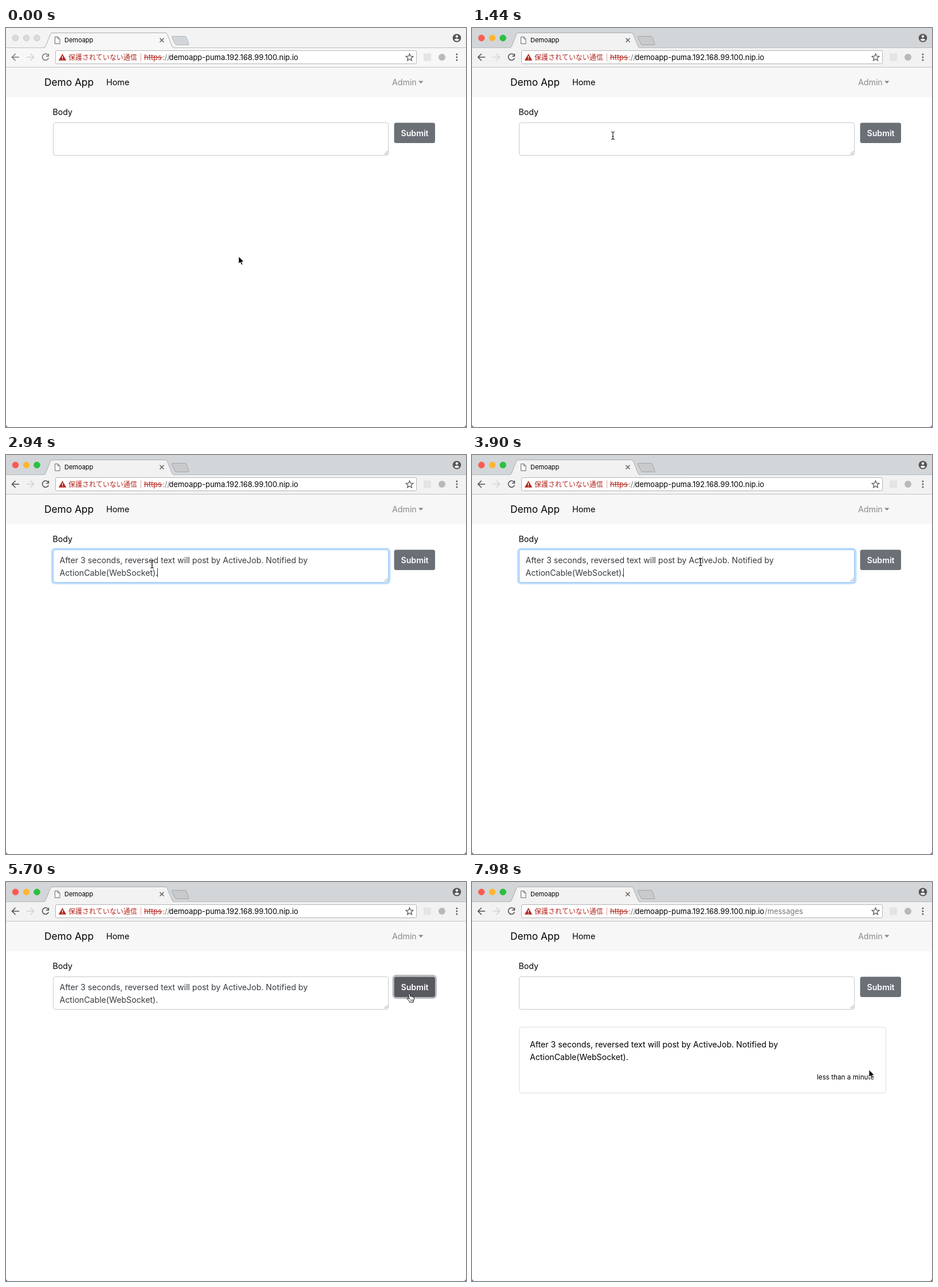
These frames come from a looping animation (803 by 697 pixels, 8 s). An HTML page:

```html
<!DOCTYPE html>
<html lang="en">
<head>
<meta charset="utf-8">
<title>Demoapp</title>
<style>
html, body { margin: 0; width: 100%; height: 100%; overflow: hidden; background: #fff; }
svg { display: block; width: 803px; height: 697px; font: 14.15px Inter, sans-serif; cursor: none; }
text { fill: #000; }
.strip { fill: #f3f3f3; }
.bar { fill: #f7f7f7; }
.tab { fill: #f7f7f7; stroke: #a9abad; }
.plus { fill: #d2d6da; stroke: #b4b7ba; }
.lamps circle { fill: #dadada; stroke: #c8c8c8; }
.nav { stroke: #777; }
.active .strip { fill: #d2d6d9; }
.active .bar, .active .tab { fill: #f2f2f2; }
.active .plus { fill: #c8cacc; stroke: #a2a4a6; }
.active .nav { stroke: #505050; }
.active .lamps circle { fill: var(--c); stroke: var(--c); }
.line { fill: none; stroke-width: 1.6; }
.small { font-size: 11px; }
.url { font-size: 12.95px; }
.typed text { fill: #363b41; }
.url .warn { fill: #b3261e; }
.jp { font: 12px "Noto Sans CJK JP", "Noto Sans CJK", sans-serif; }
.pointer { stroke: #fff; stroke-width: 1; stroke-linejoin: round; }
</style>
</head>
<body>
<svg id="win" viewBox="0 0 803 697">
  <rect width="803" height="697" fill="#fff"/>

  <!-- tab strip -->
  <rect class="strip" width="803" height="34"/>
  <g class="lamps">
    <circle cx="16.5" cy="17.5" r="5.3" style="--c:#fb5a52"/>
    <circle cx="35.5" cy="17.5" r="5.3" style="--c:#fdb632"/>
    <circle cx="54" cy="17.5" r="5.3" style="--c:#2bbf3f"/>
  </g>
  <rect class="bar" y="34" width="803" height="34"/>
  <path d="M0 34.5H803" stroke="#b9bbbd"/>
  <path class="tab" d="M66 34.5Q68.5 34 69.5 31L77.5 11Q78.5 8.5 81 8.5H278Q280.5 8.5 281.5 11L289.5 31Q290.5 34 293 34.5"/>
  <path class="bar" d="M68 34H291V36H68Z"/>
  <path class="plus" d="M291 14.5H312Q314 14.5 315 16.5L319 27.5Q320 29.5 318 29.5H298Q296 29.5 295 27.5L289.5 16.5Q289 14.5 291 14.5Z"/>
  <path d="M85.5 15.5H90.5L94 19V27.5H85.5ZM90.5 15.5V19H94" fill="#fff" stroke="#666"/>
  <text class="small" x="102" y="25">Demoapp</text>
  <path class="line" d="M268.5 17.7L275.5 24.7M275.5 17.7L268.5 24.7" stroke="#555" style="stroke-width:1.3"/>
  <circle cx="787" cy="17.5" r="7.3" fill="#555"/>
  <circle cx="787" cy="14.7" r="2.3" fill="#f2f2f2"/>
  <path d="M782.5 20.5Q787 16.5 791.5 20.5Q787 25 782.5 20.5Z" fill="#f2f2f2"/>

  <!-- toolbar -->
  <path class="line nav" d="M23 51H11M16.5 45L10.5 51L16.5 57"/>
  <path class="line" d="M36 51H48M42.5 45L48.5 51L42.5 57" stroke="#d2d2d2"/>
  <path class="line nav" d="M73.5 47.3A5.6 5.6 0 1 0 74.3 52.5M74.3 45V49.3H70"/>
  <rect x="86.5" y="39.5" width="630" height="23" rx="2" fill="#fff" stroke="#b5b5b5"/>
  <path d="M98.5 45L105.2 56.7H91.8Z" fill="#b3261e"/>
  <path d="M98.5 48.8V53M98.5 54V55.3" stroke="#fff" stroke-width="1.4"/>
  <path d="M235.5 44V58" stroke="#d9a5a2"/>
  <g class="url">
    <text class="warn jp" x="109" y="55.5">保護されていない通信</text>
    <text class="warn" x="241" y="55.5">https</text>
    <path d="M241 51.5H273" stroke="#b3261e"/>
    <text x="273" y="55.5" style="fill:#777">://</text>
    <text x="284.5" y="55.5">demoapp-puma.192.168.99.100.nip.io</text>
    <text id="path" x="511" y="55.5" style="fill:#777">/messages</text>
  </g>
  <path id="star" fill="none" stroke="#5a5a5a" stroke-width="1.3"/>
  <rect x="729" y="44.5" width="13" height="13" fill="#e4e4e4"/>
  <circle cx="761" cy="51" r="6" fill="#b9b9b9"/>
  <g fill="#5a5a5a">
    <circle cx="787" cy="46" r="1.5"/><circle cx="787" cy="51" r="1.5"/><circle cx="787" cy="56" r="1.5"/>
  </g>
  <path d="M0 68.5H803" stroke="#c2c2c2"/>

  <!-- page -->
  <rect y="69" width="803" height="52" fill="#f7f7f7"/>
  <text x="67" y="101" font-size="17.3">Demo App</text>
  <text x="175" y="100" font-size="14.4">Home</text>
  <text x="674" y="100" font-size="14.2" style="fill:#888">Admin</text>
  <path d="M720 92.5H728.5L724.25 97Z" fill="#888"/>
  <text x="81.5" y="152">Body</text>

  <rect id="glow" x="80.5" y="164" width="589" height="60" rx="5" fill="none" stroke="#bfdeff" stroke-width="3.5"/>
  <rect id="field" x="82.5" y="165.5" width="585" height="57" rx="3.5" fill="#fff"/>
  <path d="M660.5 221L666.5 215M664 221L666.5 218.5" stroke="#777" stroke-width=".9"/>
  <g id="typed" class="typed"></g>
  <path id="caret" stroke="#333"/>

  <rect id="ring" x="676" y="163.5" width="74.5" height="39" rx="5" fill="none" stroke="#b8bcc0" stroke-width="3"/>
  <rect id="button" x="677.5" y="165.5" width="71.5" height="35.5" rx="3.5"/>
  <text x="689.5" y="188.5" font-weight="600" style="fill:#fff">Submit</text>

  <g id="card">
    <rect x="82.5" y="253.5" width="640" height="115" rx="3.5" fill="#fff" stroke="#dcdcdc"/>
    <g id="message"></g>
    <text x="602" y="345" font-size="11.7">less than a minute</text>
  </g>

  <path d="M0 692Q0 697 5 697H0ZM803 692Q803 697 798 697H803Z" fill="#6f6873"/>

  <g id="mouse">
    <path id="arrow" class="pointer" d="M0 0V13L3 10.3L5 15L7.3 14L5.3 9.5H9.5Z"/>
    <path id="beam" class="line" d="M-3 -6.5Q0 -6.5 0 -4.5Q0 -6.5 3 -6.5M0 -5V5M-3 6.5Q0 6.5 0 4.5Q0 6.5 3 6.5M-1.5 1.5H1.5" stroke="#222" style="stroke-width:1.2"/>
    <g id="hand">
      <path d="M-.5 1Q.7 -1 2 1L3 5Q4.5 4 5.3 5.5Q7 4.7 7.5 6.3Q9.5 6 9.5 8Q9.7 11 8 13V15H1.5V13.5L-3 9Q-3.5 7 -1 8L1 9.5Z" fill="#fff" stroke="#111"/>
      <path d="M3.5 10V13M5.5 10V13M7.3 10V13" stroke="#111" stroke-width=".7"/>
    </g>
  </g>
</svg>
<script>
const el = id => document.getElementById(id);
const show = (id, on) => el(id).style.display = on ? '' : 'none';
const LOOP = 8000, STEP = 60;
const FOCUS = 1840, PASTE = 2640, CLICK = 5400, LOADED = 5940;

const lines = ['After 3 seconds, reversed text will post by ActiveJob. Notified by', 'ActionCable(WebSocket).'];
const paragraph = (x, y) => lines.map((s, i) => `<text x="${x}" y="${y + i * 22.3}">${s}</text>`).join('');
el('typed').innerHTML = paragraph(93.5, 188.5);
el('message').innerHTML = paragraph(101, 289);

el('star').setAttribute('d', 'M' + Array.from({ length: 10 }, (_, i) => {
  const a = i * Math.PI / 5, r = i % 2 ? 2.9 : 6.6;
  return [704.5 + r * Math.sin(a), 51.5 - r * Math.cos(a)];
}).join('L') + 'Z');

// time, x, y of the pointer's hot spot
const route = [
  [0, 406, 399], [240, 406, 399], [900, 246, 188], [1440, 246, 188], [1800, 255, 190.5],
  [3480, 255, 190.5], [3900, 399, 187], [4320, 610, 186], [4680, 703, 195],
  [5700, 703, 195], [5880, 700, 252], [6060, 693, 328], [LOOP, 693, 328]
];

function pointerAt(t) {
  const i = route.findIndex(p => p[0] > t);
  const [t0, x0, y0] = route[i - 1], [t1, x1, y1] = route[i];
  let k = (t - t0) / (t1 - t0);
  if (t < 900) k = k * k * (3 - 2 * k);
  return [x0 + (x1 - x0) * k, y0 + (y1 - y0) * k];
}

const inside = (x, y, l, t, r, b) => x > l && x < r && y > t && y < b;

function draw(now) {
  const t = Math.floor(now % LOOP / STEP) * STEP;
  const active = t >= 1140, loaded = t >= LOADED;
  const focused = t >= FOCUS && t < CLICK;
  const pasted = t >= PASTE && !loaded;
  const [x, y] = pointerAt(t);
  const overButton = inside(x, y, 677, 165, 749, 201);
  const overField = t >= 1440 && inside(x, y, 82, 165, 668, 223);

  el('win').classList.toggle('active', active);
  show('path', loaded);
  show('card', loaded);
  show('typed', pasted);

  show('glow', focused);
  el('glow').style.opacity = Math.min(1, (t - FOCUS) / 150);
  el('field').style.stroke = focused ? '#8fc3f7' : '#c6c9cc';
  show('caret', focused && (t - (pasted ? PASTE : FOCUS)) % 1000 < 500);
  el('caret').setAttribute('d', pasted ? 'M264.5 197.5V213.5' : 'M94.5 175V191');

  show('ring', t >= CLICK && !loaded);
  el('button').style.fill = overButton ? '#58585f' : '#6b7077';

  el('mouse').setAttribute('transform', `translate(${Math.round(x)} ${Math.round(y)})`);
  show('arrow', !overButton && !overField);
  show('beam', overField);
  show('hand', overButton);
}

function tick() {
  draw(performance.now());
  requestAnimationFrame(tick);
}
tick();
</script>
</body>
</html>
```
